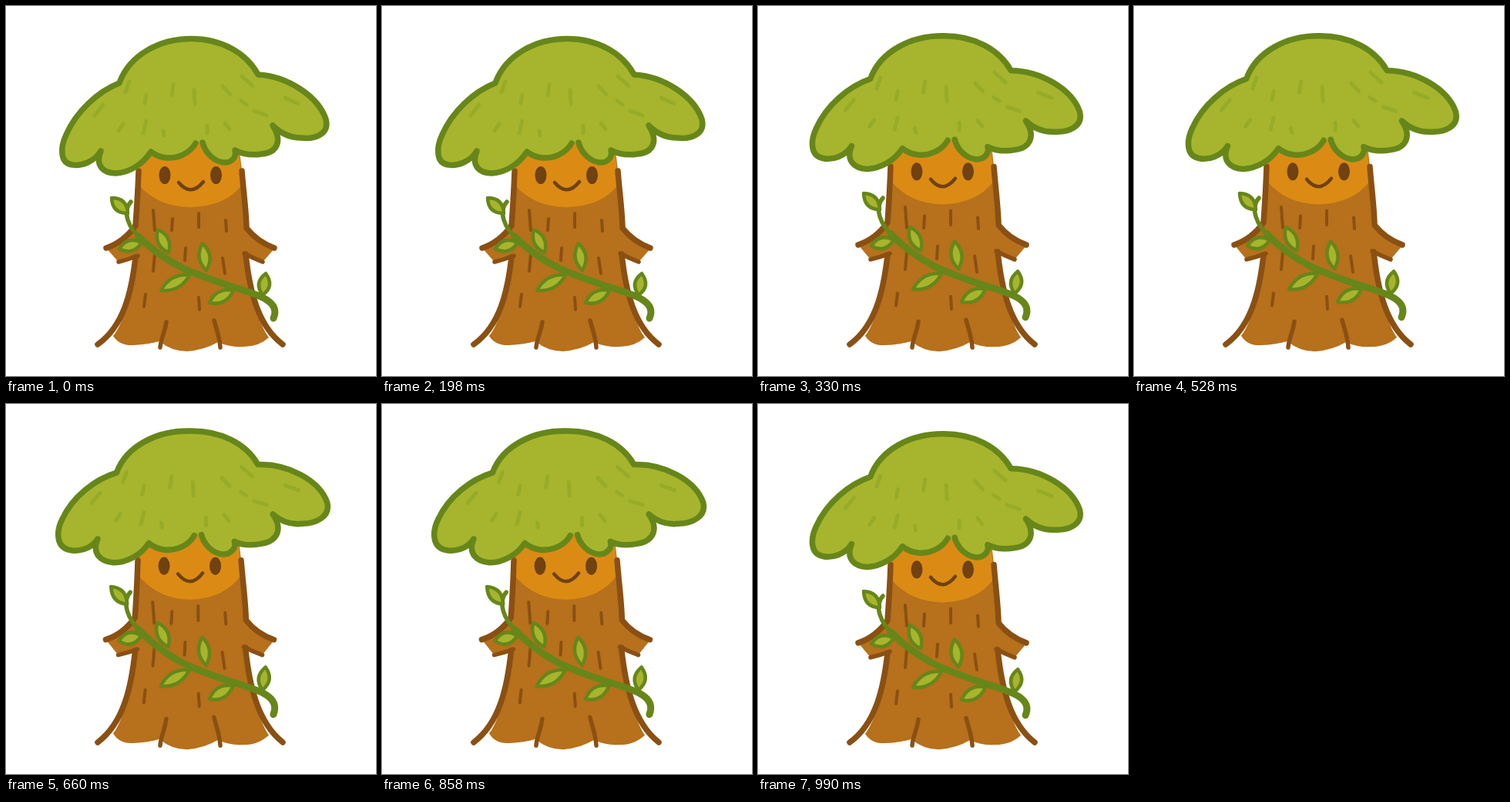
Recreate the animation shown at these times as an HTML page. Size 480x480 px, loop 1320 ms.

```html
<!DOCTYPE html>
<html lang="en">
<head>
<meta charset="utf-8">
<title>Happy tree</title>
<style>
html, body { margin: 0; width: 100%; height: 100%; overflow: hidden; background: #fff; }
svg { display: block; width: 100vw; height: 100vh; stroke-linecap: round; stroke-linejoin: round; }
</style>
</head>
<body>
<svg id="tree" viewBox="0 0 480 480"></svg>
<script>
const STEP = 330;
const POSES = [0, 1, 2, 1];
const BARK = '#b7701b', DARK = '#8a5013', FACE = '#db8b14', EYE = '#704111';
const GREEN = '#a6b52d', RIM = '#67861a', SHADE = '#97ab29';

const trunk = `M176,170 L173,214 C172,245 168,270 167,286 C158,298 145,308 130,314
  L145,331 L168,326 C163,370 153,412 139,428
  Q147,441 165,440 Q185,439 199,435 Q215,448 235,448 Q258,446 275,436
  Q290,443 308,442 Q328,442 341,430 C328,413 317,370 311,324
  L333,332 L348,315 C335,309 322,301 312,288 L306,214 L301,170 Z`;
const face = 'M176,170 L173,233 Q198,261 240,261 Q285,260 306,232 L301,170 Z';
const sides = `M172,214 C171,245 169,270 168,285 C157,300 145,309 130,314
  M168,326 C163,370 153,415 119,439
  M306,214 C308,240 312,270 312,288 C322,301 335,309 348,314
  M311,322 C316,370 327,415 359,439`;
const folds = `M146,332 Q158,329 171,324 M333,332 Q320,327 309,321
  M208,410 C206,425 201,430 200,443 M270,408 C273,420 277,428 278,443`;
const grain = `M191,265 L193,291 M216,276 L215,291 M250,269 L250,287 M285,278 L286,292
  M233,314 L232,330 M193,322 L191,344 M281,327 L284,347 M181,374 L179,390 M250,378 L251,394`;
const smile = 'M224,229 Q240,248 256,228';

const crownRim = `M246,178 C238,192 222,198 208,197 C200,196 193,193 188,189
  C178,205 160,216 143,217 C127,217 115,208 123,188
  C115,202 98,208 86,206 C70,204 70,184 78,167 C91,137 119,111 147,100
  C160,63 200,42.5 240,42.5 C280,42.5 312,61 327,89
  C365,91 405,117 415,147 C420,167 400,173 383,171 C370,171 357,166 346,155
  C359,175 352,190 332,192 C318,194 306,192 297,187
  C300,196 292,204 282,203 C268,201 258,189 255,177`;
const tufts = `M160,98 L155,112 M182,115 L180,126 M217,102 L215,116 M244,109 L245,127
  M281,104 L291,115 M306,91 L320,104 M126,128 L115,142 M152,153 L146,162
  M182,149 L178,165 M204,162 L205,168 M261,155 L261,165 M284,152 L290,160
  M305,123 L312,128 M322,136 L338,142 M362,119 L379,127`;

const vineTip = 'M162,254 C151,266 157,288 178,304';
const vine = 'M172,299 C212,339 250,349 290,363 C325,374 357,382 347,405';
// base x, base y, tip x, tip y
const leaves = [
  [158, 269, 137, 249], [176, 307, 147, 315], [211, 320, 197, 290], [260, 343, 255, 308],
  [238, 349, 201, 369], [295, 369, 264, 385], [333, 375, 337, 347]
];

// The trunk stretches upward from its fixed roots.
const stretch = k => (x, y) => {
  const d = x - 240;
  return [x - (k > 1 ? 1 : 0) * (440 - y) / 230, y - k * (440 - y) * (.02 + 1.1e-6 * d * d)];
};

// The crown rises, its outer ends most of all.
const lift = k => (x, y) => {
  const d = x - 240;
  return [x + d * .0135 * Math.sqrt(k) - (k > 1 ? 1.8 : 0),
    y - k * (3.7 + 5.5 * (d / 165) ** 2)];
};

const warp = (d, move) => d.replace(/([\d.]+),([\d.]+)/g,
  (_, x, y) => move(+x, +y).map(n => n.toFixed(2)).join());

const shape = (d, fill, stroke = 'none', width = 0) =>
  `<path d="${d}" fill="${fill}" stroke="${stroke}" stroke-width="${width}"/>`;
const line = (d, color, width) => shape(d, 'none', color, width);

function leafPath([x, y, tx, ty]) {
  const dx = tx - x, dy = ty - y, s = 14 / Math.hypot(dx, dy);
  const side = m => `${x + dx * .5 - dy * s * m},${y + dy * .5 + dx * s * m}`;
  return `M${x},${y} Q${side(1)} ${tx},${ty} Q${side(-1)} ${x},${y} Z`;
}

function draw(k) {
  const body = d => warp(d, stretch(k));
  const top = d => warp(d, lift(k));
  const eye = x => {
    const [cx, cy] = stretch(k)(x, 219.5);
    return `<ellipse cx="${cx}" cy="${cy}" rx="7.5" ry="11.5" fill="${EYE}"/>`;
  };
  return shape(body(trunk), BARK)
    + shape(body(face), FACE)
    + line(body(sides), DARK, 7.5)
    + line(body(folds), DARK, 5.5)
    + line(body(grain), DARK, 4)
    + eye(206) + eye(272.5)
    + line(body(smile), EYE, 4.5)
    + shape(top(crownRim), GREEN, RIM, 7.5)
    + line(top(tufts), SHADE, 5)
    + line(body(vineTip), RIM, 5.5)
    + line(body(vine), RIM, 9)
    + leaves.map(l => shape(body(leafPath(l)), GREEN, RIM, 4.5)).join('');
}

const tree = document.getElementById('tree');
const start = performance.now();
let shown = -1;

function tick() {
  const k = POSES[Math.floor((performance.now() - start) / STEP) % POSES.length];
  if (k !== shown) tree.innerHTML = draw(shown = k);
  requestAnimationFrame(tick);
}
tick();
</script>
</body>
</html>
```
